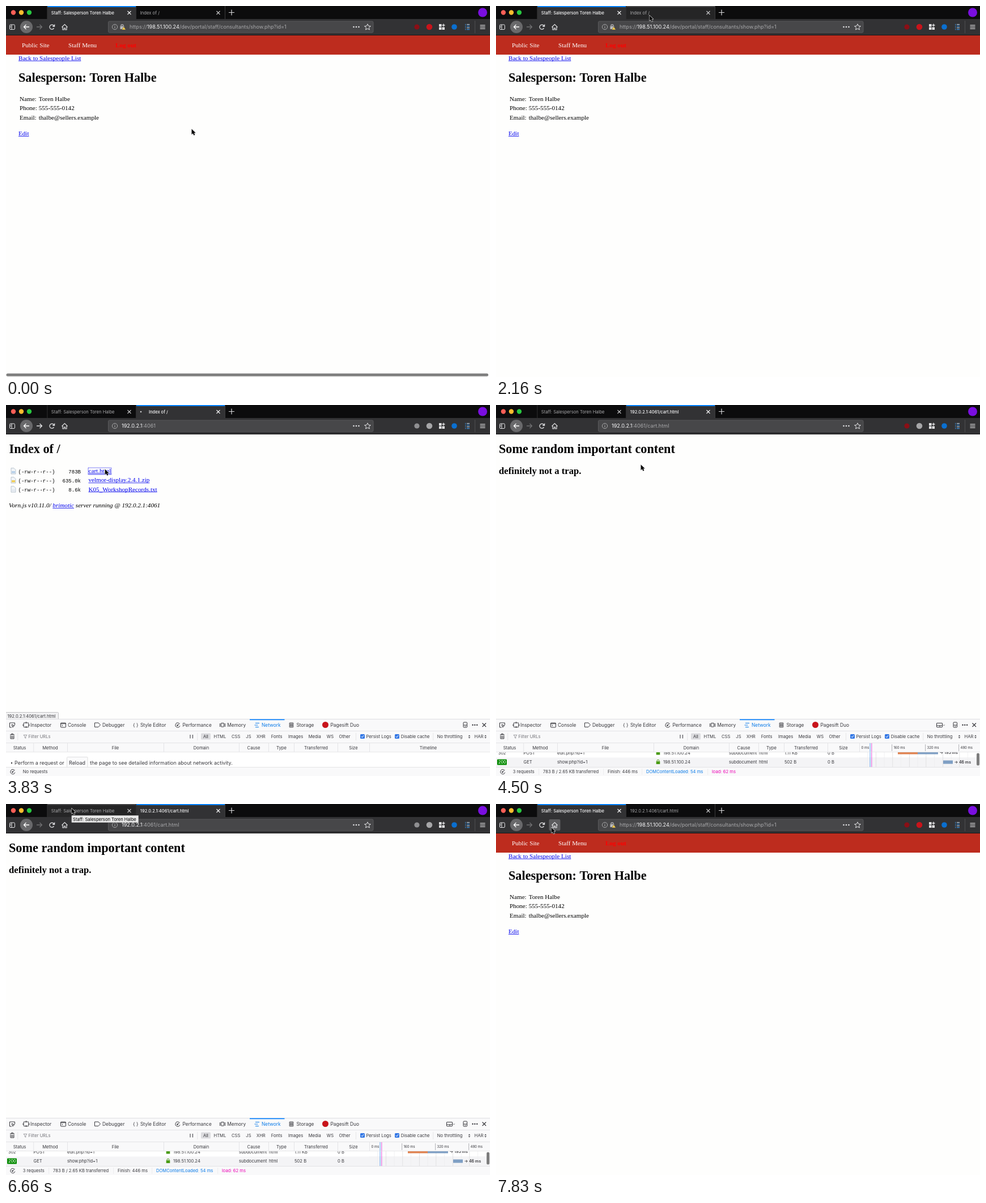
These frames come from a looping animation (854x656 px, 8 s). An HTML page with a canvas:

```html
<!DOCTYPE html>
<html lang="en">
<head>
<meta charset="utf-8">
<title>Browser session</title>
<style>
html, body { margin: 0; width: 100%; height: 100%; overflow: hidden; background: #fefefd; }
canvas { display: block; }
</style>
</head>
<body>
<canvas id="stage" width="854" height="656"></canvas>
<script>
const ctx = document.getElementById('stage').getContext('2d');
const LOOP = 8000, FPS = 6;
const UI = 'Inter, sans-serif', SERIF = '"Liberation Serif", serif', MONO = '"Liberation Mono", monospace';
const LINK = '#0000ee', BLUE = '#0a7be8', DARK = '#38383d', PALE = '#f9f9fa', ICON = '#e2e2e4';

const PERSON = 'Toren Halbe';
const STAFF = 'Staff: Salesperson ' + PERSON;
const HOST = '198.51.100.24', LOCAL = '192.0.2.1', PORT = ':4061', FILE = 'cart.html';
const FILE_URL = LOCAL + PORT + '/' + FILE;

// Cursor stops: tick, x, y
const PATH = [
  [6, 327, 217], [13, 270, 16], [17, 270, 16], [23, 174, 113], [24, 174, 113],
  [27, 255, 105], [31, 255, 105], [33, 117, -7], [34, 112, 5], [37, 115, 7],
  [41, 115, 7], [44, 110, 45], [45, 110, 45], [47, 97, 41]
];

function rect(x, y, w, h, color) {
  ctx.fillStyle = color;
  ctx.fillRect(x, y, w, h);
}

function box(x, y, w, h, r, fill, stroke) {
  ctx.beginPath();
  ctx.roundRect(x, y, w, h, r);
  if (fill) { ctx.fillStyle = fill; ctx.fill(); }
  if (stroke) { ctx.strokeStyle = stroke; ctx.lineWidth = 1; ctx.stroke(); }
}

function disc(x, y, r, fill) {
  ctx.beginPath();
  ctx.arc(x, y, r, 0, 7);
  ctx.fillStyle = fill;
  ctx.fill();
}

function ring(x, y, r, color, from = 0, to = Math.PI * 2, width = 1) {
  ctx.beginPath();
  ctx.arc(x, y, r, from, to);
  ctx.strokeStyle = color;
  ctx.lineWidth = width;
  ctx.stroke();
}

// Icon strokes from SVG path data
function line(d, color, width = 1, fill) {
  const p = new Path2D(d);
  if (fill) { ctx.fillStyle = fill; ctx.fill(p); }
  ctx.strokeStyle = color;
  ctx.lineWidth = width;
  ctx.stroke(p);
}

// Draws text on its baseline and returns its end
function text(s, x, y, font, color, align = 'left') {
  ctx.font = font;
  ctx.fillStyle = color;
  ctx.textAlign = align;
  ctx.fillText(s, x, y);
  return x + ctx.measureText(s).width;
}

// Interface text, centred vertically on y
const ui = (s, x, y, color = DARK, size = 7.63, weight = 400, align) =>
  text(s, x, y + size * 0.36, `${weight} ${size}px ${UI}`, color, align);

const serif = (s, x, y, color = '#000', size = 11.13, style = '') =>
  text(s, x, y, `${style} ${size}px ${SERIF}`, color);

function link(s, x, y, style) {
  const end = serif(s, x, y, LINK, 11.13, style);
  rect(x, y + 1, end - x, 0.8, LINK);
  return end;
}

function cursorAt(k) {
  if (k <= PATH[0][0]) return PATH[0].slice(1);
  const i = Math.max(1, PATH.findIndex(p => p[0] >= k));
  const [a, x0, y0] = PATH[i - 1], [b, x1, y1] = PATH[i];
  const u = (k - a) / (b - a), e = u * u * (3 - 2 * u);
  return [x0 + (x1 - x0) * e, y0 + (y1 - y0) * e];
}

function tab(x, title, active, hover, loading) {
  if (active) {
    rect(x, 0, 156, 24, '#323234');
    rect(x, 0, 156, 2, '#0a84ff');
  } else if (hover) {
    rect(x, 0, 156, 23, '#252526');
    rect(x, 0, 156, 1.5, '#59595b');
  }
  if (loading) disc(x + 8, 12, 1.3, '#cfcfd1');
  ui(title, x + (loading ? 22 : 6.8), 12.2, active ? '#f9f9fa' : '#a9a9ab', active ? 7.5 : 7.63, active ? 500 : 400);
  line(`M${x + 141.5} 9l6 6m0-6l-6 6`, active ? '#f9f9fa' : '#c8c8ca', 1.1);
}

function chrome(s) {
  rect(0, 0, 854, 24, '#0c0c0d');
  ['#ff5f57', '#febc2e', '#28c840'].forEach((c, i) => disc(13 + 14 * i, 11.5, 4.2, c));
  const overTab = s.y < 23;
  tab(73, STAFF, s.page === 'staff', overTab && s.x < 229);
  tab(230, s.k < 24 ? 'Index of /' : FILE_URL, s.page !== 'staff', overTab && s.x > 229, s.k === 23);
  rect(72.5, 0, 0.8, 23, '#38383a');
  rect(229, 0, 0.8, 23, '#38383a');
  rect(386, 0, 0.8, 23, '#48484a');
  line('M393 11.5h10M398 6.5v10', '#d8d8da', 1.2);
  disc(841, 11.5, 8, '#7a0ee0');

  rect(0, 23, 854, 28.5, '#323234');
  if (s.page !== 'staff') rect(230, 22, 156, 2, '#323234');
  else rect(73, 22, 156, 2, '#323234');
  rect(0, 51, 854, 1, '#161617');

  box(6.5, 33, 9, 8.5, 1.5, null, ICON);
  line('M10 33v8.5M7.5 35.5h1.5M7.5 37.5h1.5', ICON);
  disc(36, 37, 11, '#69696b');
  line('M41 37h-9.5M35.5 33l-4 4l4 4', '#fff', 1.3);
  line('M54 37h9.5M59.500 33l4 4l-4 4', s.page === 'index' ? ICON : '#707072', 1.3);
  ring(81, 37.2, 4, ICON, 0.5, 5.5, 1.3);
  line('M86 32.500v4h-4z', ICON, 0.5, ICON);
  if (s.x > 93 && s.x < 114 && s.y > 27 && s.y < 48) box(93.5, 27, 20, 20, 2, '#5c5c5e');
  line('M98.500 37.500l5-5l5 5M100 37v5h2.500v-3h2v3h2.500v-5', ICON, 1.2);

  box(180.5, 27, 467.500, 20, 2, '#474749', '#58585a');
  ring(192, 37, 4.6, '#b1b1b3', 0, 7, 0.9);
  line('M192 36.200v3.200M192 34.200v1', '#b1b1b3');
  if (s.page === 'staff') {
    ring(205, 35, 2.2, '#b9b9bb', Math.PI, 0, 1.2);
    rect(201.500, 35.500, 7, 5.500, '#b9b9bb');
    line('M207.800 36.500l3.600 5.500h-7.200z', '#474749', 0.6, '#ffd24a');
  }
  const url = (t, x, c) => ui(t, x, 37.2, c, 9.1);
  if (s.page === 'staff') {
    const a = url('https://', 218, '#a9a9ab');
    url('/dev/portal/staff/consultants/show.php?id=1', url(HOST, a, '#f9f9fa'), '#a9a9ab');
  } else {
    url(PORT + (s.page === 'trap' ? '/' + FILE : ''), url(LOCAL, 204, '#f9f9fa'), '#a9a9ab');
  }
  [613.5, 618, 622.5].forEach(x => disc(x, 37, 1.3, ICON));
  line('M638 31.800l1.600 3.500l3.800 .400l-2.900 2.500l.900 3.800l-3.400-2l-3.400 2l.900-3.800l-2.900-2.500l3.800-.400z', ICON);

  const shieldOn = s.page === 'staff' || (s.k >= 24 && s.k < 31);
  disc(725, 37, 4.6, shieldOn ? '#8a0f16' : '#8f8f91');
  disc(747, 37, 5.3, s.page === 'staff' ? '#c8141b' : '#a6a6a8');
  rect(764, 32, 4.5, 4.5, ICON);
  rect(764, 37.500, 4.500, 4.500, ICON);
  rect(769.500, 37.500, 4.500, 4.500, ICON);
  line('M772 31.500v5M769.500 34h5', ICON, 1.4);
  disc(791, 37, 4.8, '#0a6fd0');
  for (let i = 0; i < 4; i++) {
    rect(810, 32 + 3 * i, 1.5, 1.2, '#3a9bf0');
    rect(813, 32 + 3 * i, 5, 1.2, i % 2 ? '#3a9bf0' : '#b7cfe6');
  }
  rect(827, 26, 0.8, 22, '#555557');
  [33.5, 36.5, 39.5].forEach(y => rect(836.5, y, 9, 1.2, ICON));
}

function staffPage(k) {
  rect(0, 52, 854, 34, '#bd2c1e');
  serif('Public Site', 28, 73, '#fff');
  serif('Staff Menu', 110, 73, '#fff');
  serif('Log out', 193, 73, '#f00', 11.13, 'bold');
  link('Back to Salespeople List', 22, 95.7);
  serif('Salesperson: ' + PERSON, 22, 134, '#000', 22.26, 'bold');
  [['Name:', PERSON], ['Phone:', '555-555-0142'], ['Email:', 'thalbe@sellers.example']].forEach(([a, b], i) => {
    serif(a, 24, 168 + 16.3 * i);
    serif(b, 57.7, 168 + 16.3 * i);
  });
  link('Edit', 22, 229.2);
  const bar = k < 9 ? 1 : k < 11 ? (11 - k) / 3 : 0;
  if (bar) {
    ctx.globalAlpha = bar;
    box(0.5, 649.7, 850.5, 5, 2.5, '#7f7f7f');
    ctx.globalAlpha = 1;
  }
}

function indexPage(k) {
  serif('Index of /', 5.5, 85.3, '#000', 22.26, 'bold');
  const rows = [
    ['783B', FILE, '#b5cfe8'],
    ['635.0k', 'velmor-display.2.4.1.zip', '#f0cd55'],
    ['8.6k', 'K05_WorkshopRecords.txt', '#e3e9ef']
  ];
  rows.forEach(([size, name, tint], i) => {
    const y = 120.5 + 16.1 * i;
    line(`M9 ${y - 9}h5l3 3v7.500h-8z`, '#a3b0bd', 0.7, '#f1f4f7');
    rect(10, y - 3.5, 6, 3.5, tint);
    text('(-rw-r--r--)', 21.5, y, `9.04px ${MONO}`, '#000');
    text(size, 132, y, `9.04px ${MONO}`, '#000', 'right');
    const end = link(name, 145.5, y - 0.2);
    if (!i && k >= 23) {
      ctx.setLineDash([1, 1]);
      box(145, 111, end - 144.5, 12, 0, null, LINK);
      ctx.setLineDash([]);
    }
  });
  const a = serif('Vorn.js v10.11.0/ ', 5, 181, '#000', 11.13, 'italic');
  serif(` server running @ ${LOCAL}${PORT}`, link('brimotic', a, 181, 'italic'), 181, '#000', 11.13, 'italic');
  if (k >= 22) {
    box(-1, 543.5, 93.5, 13, 1, '#f1f1f2', '#c4c4c6');
    ui(FILE_URL, 2.5, 550);
  }
}

function trapPage() {
  serif('Some random important content', 5, 85.3, '#000', 22.26, 'bold');
  serif('definitely not a trap.', 5, 122.3, '#000', 16.7, 'bold');
}

function requestRow(y, fill, code, method, file, host, cause, size, bytes) {
  rect(0, y - 8, 641, 16.5, fill);
  if (code === '200') box(2, y - 5, 17, 10, 1, '#058b00');
  ui(code, 4, y, code === '200' ? '#fff' : DARK, 7.3);
  ui(method, 48.5, y);
  ui(file, 108, y);
  ring(286, y - 2, 2, '#4a9b14', Math.PI, 0, 1.2);
  rect(282.7, y - 1.500, 6.600, 5, '#4a9b14');
  ui(host, 295, y);
  ui(cause, 411, y);
  ui('html', 464, y);
  ui(size, 509, y);
  ui(bytes, 585, y);
}

function timing(y, spans, label, x) {
  spans.forEach(([from, to, color]) => rect(from, y - 3, to - from, 6, color));
  ui('→ ' + label, x, y, DARK, 7, 600);
}

function toolIcons() {
  line('M10 570h-3.500v-8h9v4M10 565l5 2l-2 1l-1 2z', DARK);
  box(31, 562, 9, 7.5, 1, null, DARK);
  line('M35.500 560v3M35.500 568v3M29 566h3M39 566h3', DARK);
  box(96.500, 562, 9, 8, 1, null, DARK);
  line('M96.500 563.500h9M98.500 565.500l1.500 1.200l-1.500 1.200', DARK);
  line('M156.500 562h6.500l3.500 3.700l-3.500 3.700h-6.500z', DARK);
  ui('{ }', 224, 565.5, DARK, 8.4);
  ring(303, 566, 4, DARK, 0.3, 5.4);
  line('M302.500 566.500l4-3.500', DARK);
  disc(302.500, 566.500, 1.3, DARK);
  box(379.500, 562.500, 5, 6.500, 0.5, null, DARK);
  line('M377.500 563v6M386.500 563v6', DARK);
  line('M440 562.500h7M438.500 566h6M440 569.500h6', BLUE);
  for (let i = 0; i < 3; i++) box(500, 562 + 2.800 * i, 7, 2.200, 1, null, DARK);
  disc(563.500, 565.500, 5.5, '#c8141b');
}

function devtools(k) {
  const loaded = k >= 24, full = k >= 25;
  rect(0, 555, 854, 101, PALE);
  rect(0, 555, 854, 0.8, '#d7d7db');
  toolIcons();
  rect(430, 555.5, 61.5, 1.7, '#0a84ff');
  const tabs = { Inspector: 43, Console: 109, Debugger: 170, 'Style Editor': 237, Performance: 311.5,
    Memory: 390.3, Network: 451, Storage: 512.5, 'Pagesift Duo': 572.5 };
  for (const t in tabs) ui(t, tabs[t], 565.8, t === 'Network' ? BLUE : DARK, 8.4);
  if (loaded) {
    box(777.5, 562.5, 10, 7, 0.5, null, DARK);
    line('M777.500 566.500h10M783 566.500v3M789 565.500l1.300 1.300l1.300-1.300', DARK, 0.9);
  }
  box(807, 561, 6.500, 9, 1, null, DARK);
  line('M807 566h6.500M809.500 568h2', DARK);
  [823.5, 827.3, 831.1].forEach(x => disc(x, 565.7, 1.2, DARK));
  line('M840.500 562.500l6.500 6.500m0-6.500l-6.500 6.500', DARK, 1.2);
  rect(0, 576, 854, 0.8, '#dfdfe2');

  line('M7 583h8M9.500 583v-1.500h3v1.500M8 584.500v5.500h6v-5.500M10 585v4M12 585v4', DARK, 1);
  rect(20.500, 580, 0.7, 13, '#dedee0');
  line('M31 583.500h6l-2.200 2.800v3l-1.600-1v-2z', '#8a8a8f', 0.8);
  ui('Filter URLs', 39.5, 586.3, '#737378');
  line('M325 583v6.500M329.500 583v6.500', DARK);
  rect(337.500, 580, 0.7, 13, '#dedee0');
  box(344, 580.5, 17, 11, 1.5, '#dcdcdf');
  const filters = { All: 348, HTML: 366.5, CSS: 398, JS: 423.3, XHR: 442, Fonts: 467.7, Images: 498,
    Media: 533.7, WS: 565.8, Other: 587.5, 'Persist Logs': 635.5, 'Disable cache': 696.7,
    'No throttling': 760.7, HAR: 826.5 };
  for (const f in filters) ui(f, filters[f], 586.3);
  rect(617, 580, 0.7, 13, '#dedee0');
  rect(753.500, 580, 0.7, 13, '#dedee0');
  [625, 686].forEach(x => {
    box(x, 582, 8, 8, 1.5, '#3478e5');
    line(`M${x + 1.8} 586l1.700 2l2.800-4`, '#fff');
  });
  [817.5, 846].forEach(x => line(`M${x - 1.5} 585.500l1.500-1.800l1.500 1.800zM${x - 1.5} 587.500l1.500 1.800l1.500-1.800z`, DARK, 0.3, DARK));
  rect(0, 597, 854, 0.8, '#dfdfe2');

  rect(0, 614, 854, 26, '#fff');
  ctx.save();
  ctx.beginPath();
  ctx.rect(0, 614, 854, 26);
  ctx.clip();
  if (full) {
    requestRow(615, '#fff', '302', 'POST', 'edit.php?id=1', HOST, 'subdocument', '1.11 KB', '0 B');
    requestRow(631.5, '#f4f4f6', '200', 'GET', 'show.php?id=1', HOST, 'subdocument', '502 B', '0 B');
    rect(641, 623, 213, 17, '#f4f4f6');
  } else if (loaded) {
    requestRow(622, '#fff', '200', 'GET', FILE, LOCAL + PORT, 'document', '783 B', '783 B');
  } else {
    disc(10, 633, 1.2, DARK);
    ui('Perform a request or', 15, 632.5, DARK, 8.97);
    box(107.5, 622.5, 36.5, 20, 1, '#fbfbfc', '#dededf');
    ui('Reload', 111, 632.5, DARK, 8.97);
    ui('the page to see detailed information about network activity.', 148, 632.5, DARK, 8.97);
  }
  if (loaded) {
    for (let i = 1; i < 14; i++) rect(640.5 + 14.75 * i, 614, 0.7, 26, i % 2 ? '#ececee' : '#d9d9dc');
  }
  if (full) {
    timing(614.5, [[709, 744, '#df8250'], [744, 780, '#7f9fc4']], '193 ms', 782.5);
    timing(631.5, [[789, 806, '#7f9fc4']], '46 ms', 808.5);
    box(848, 615.5, 5, 22, 2.5, '#7d7d7d');
  }
  ctx.restore();

  const heads = { Status: 24, Method: 78, File: 193, Domain: 344.5, Cause: 437, Type: 486, Transferred: 547, Size: 613 };
  for (const h in heads) ui(h, heads[h], 606, DARK, 7.63, 400, 'center');
  [48.5, 108, 278, 411, 463, 508, 585, 641].forEach(x => rect(x, 598, 0.7, 15, '#dcdcdf'));
  if (loaded) {
    [0, 160, 320, 480].forEach((ms, i) => {
      const x = 640 + 59 * i;
      ui(ms + ' ms', x + (i ? 2.5 : 4.5), 606.3, DARK, 6);
      if (i) rect(x - 0.7, 600, 0.8, 12, '#a0a0a4');
    });
    rect(659.6, 598, 0.9, 42, '#4a9af0');
    rect(662.4, 598, 0.9, 42, '#e040d8');
  } else {
    ui('Timeline', 745, 606, DARK, 7.63, 400, 'center');
  }
  rect(0, 613.4, 854, 0.7, '#dfdfe2');
  rect(0, 640, 854, 0.8, '#dfdfe2');

  ring(12, 648.5, 4, DARK, 0.3, 5.4);
  line('M11.500 649l4-4', DARK);
  disc(11.500, 649, 1.3, DARK);
  if (loaded) {
    ui(full ? '3 requests' : '1 request', 29.7, 648.3);
    ui(full ? '783 B / 2.65 KB transferred' : '783 B / 783 B transferred', 83, 648.3);
    if (full) ui('Finish: 446 ms', 197, 648.3);
    ui('DOMContentLoaded: 54 ms', 265, 648.3, BLUE);
    ui('load: 62 ms', 381, 648.3, '#ed00b5');
    [75.5, 189.5, 257.5, 373.5].forEach(x => rect(x, 643, 0.6, 11, '#e4e4e6'));
  } else {
    ui('No requests', 29.7, 648.3);
  }
}

function pointer(x, y) {
  ctx.save();
  ctx.translate(x, y);
  ctx.lineJoin = 'round';
  line('M.7 .7v9.200l2.200-2l1.600 3.700l1.700-.8l-1.600-3.500h2.800z', '#fff', 1.3, '#000');
  line('M.7 .7v9.200l2.200-2l1.600 3.700l1.700-.8l-1.600-3.500h2.800z', '#000', 0.3, '#0a0a0a');
  ctx.restore();
}

function draw(ms) {
  const k = Math.floor((ms + 7) * FPS / 1000) % (LOOP * FPS / 1000);
  const [x, y] = cursorAt(k);
  const page = k < 14 || k >= 41 ? 'staff' : k < 24 ? 'index' : 'trap';
  rect(0, 0, 854, 656, '#fefefd');
  if (page === 'staff') staffPage(k);
  else {
    if (page === 'index') indexPage(k);
    else trapPage();
    devtools(k);
  }
  chrome({ k, x, y, page });
  if (k === 40) {
    box(116, 20.5, 117.5, 12, 0, '#e9e9e9', '#b5b5b5');
    ui(STAFF, 118, 26.8, '#000');
  }
  pointer(x, y);
}

const start = performance.now();
function tick() {
  draw((performance.now() - start) % LOOP);
  requestAnimationFrame(tick);
}
tick();
</script>
</body>
</html>
```
